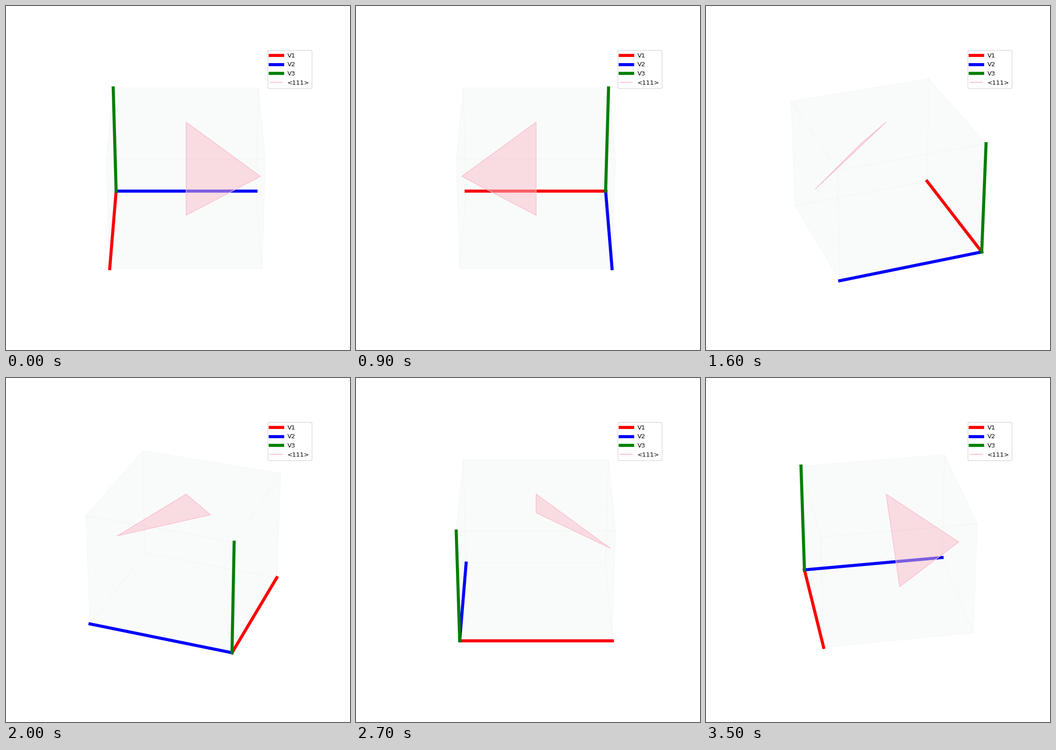
Animation, 748 px wide and 748 px high, one loop 3.6 s. Source, as a matplotlib script:

```python
from itertools import product

import matplotlib.pyplot as plt
import numpy as np
from matplotlib.animation import FuncAnimation
from mpl_toolkits.mplot3d.art3d import Poly3DCollection

SIZE, DPI = 748, 96
FRAMES, INTERVAL = 36, 100

plt.rcParams["font.family"] = "DejaVu Sans"
fig = plt.figure(figsize=(SIZE / DPI, SIZE / DPI), dpi=DPI, facecolor="white")
ax = fig.add_subplot(projection="3d")
ax.set_axis_off()


def span(margin):
    """Limits around the unit interval, widened by the 3D view margin."""
    half = (0.5 + margin) * (1 + 1 / 24)
    return 0.5 - half, 0.5 + half


def cube_faces():
    square = [(0, 0), (1, 0), (1, 1), (0, 1)]
    return [np.insert(square, axis, side, axis=1)
            for axis, side in product(range(3), (0, 1))]


# Basis vectors
for axis, color in zip(np.eye(3), ("red", "blue", "green")):
    ax.plot(*np.transpose([np.zeros(3), axis]), color=color, lw=5)

# Unit cell
ax.add_collection3d(Poly3DCollection(
    cube_faces(), facecolors=(0.27, 0.51, 0.71, 0.0157),
    edgecolors=(0, 0, 0, 0.012), linewidths=1))

# Plane through three face centres
triangle = [(1, 0.5, 0.5), (0.5, 1, 0.5), (0.5, 0.5, 1)]
ax.add_collection3d(Poly3DCollection(
    [triangle], facecolors="pink", edgecolors="pink", linewidths=1, alpha=0.5))
plane_key, = ax.plot([], [], [], color="pink")

ax.set(xlim=span(0.05), ylim=span(0.05), zlim=span(0))
ax.legend(ax.lines, ["V1", "V2", "V3", "<111>"], loc="upper right")


def update(i):
    ax.view_init(elev=30, azim=i * 360 / FRAMES)
    return ax.collections


anim = FuncAnimation(fig, update, frames=FRAMES, interval=INTERVAL,
                     repeat=True, repeat_delay=0, blit=False)
plt.show()
```
